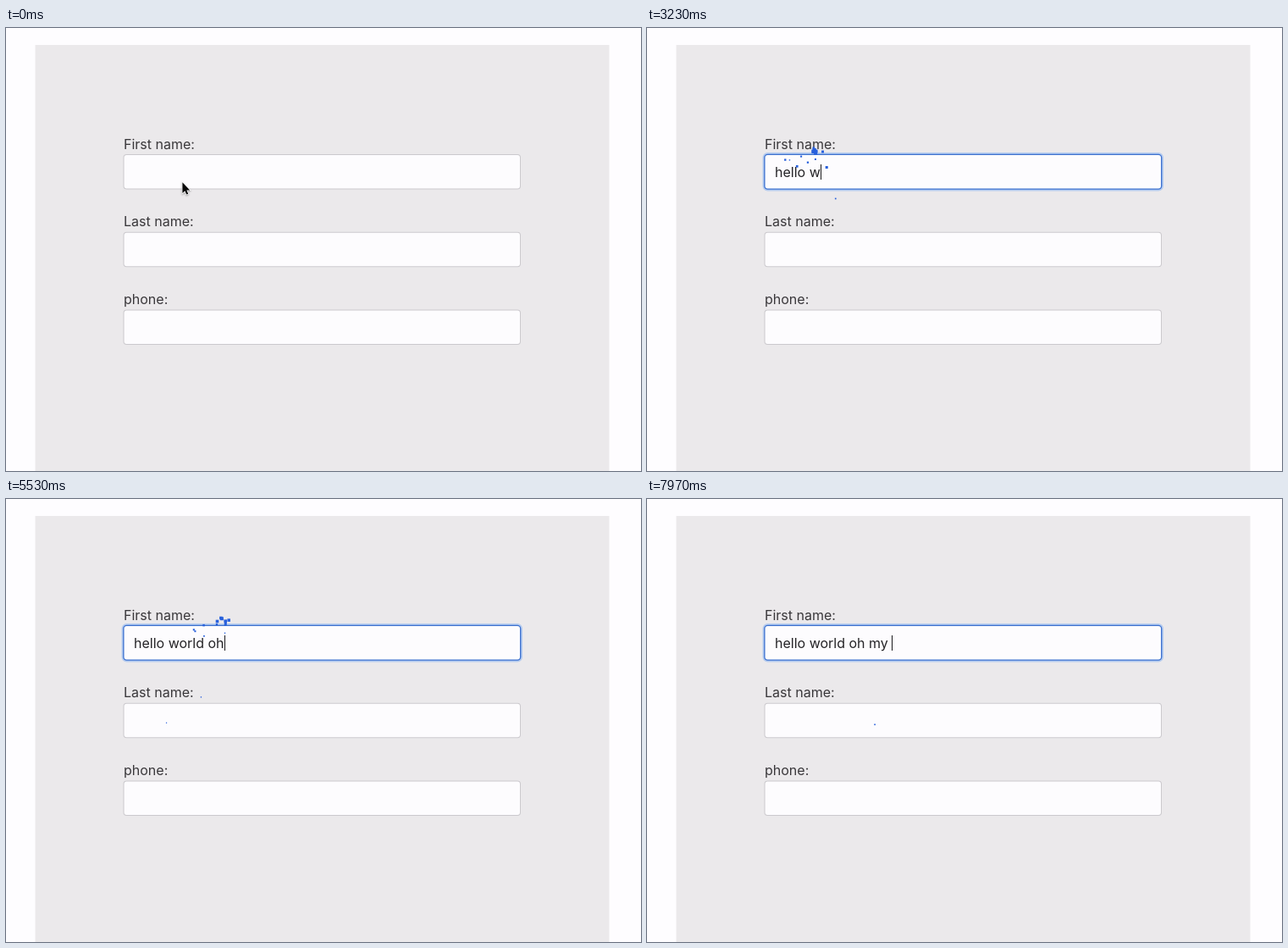
Animation of 750 by 523 pixels, one loop 8000 ms. Source, as an HTML page with a canvas:

```html
<!DOCTYPE html>
<html lang="en">
<head>
<meta charset="utf-8">
<title>Typing sparks</title>
<style>
  html, body { margin: 0; width: 100%; height: 100%; overflow: hidden; background: #fefdff; }
  canvas { display: block; width: 750px; height: 523px; }
</style>
</head>
<body>
<canvas id="stage"></canvas>
<script>
const W = 750, H = 523, LOOP = 8000;
const LABELS = ['First name:', 'Last name:', 'phone:'];
const FIELD = { x: 138.5, y: 149, w: 469.5, h: 41.5, pitch: 91.7 };
const TEXT_X = 151, TEXT_Y = 176, SPARK_Y = 161;
const FOCUS = 30, BLINK = 470;
const GRAVITY = 0.0005;

const MESSAGE = 'hello world oh my ';
const PRESSES = [
  970, 1450, 1730, 2010, 2400, 2700, 3030, 3350, 3600,
  3850, 4170, 4600, 5020, 5350, 5780, 6200, 6600, 7010
];

const canvas = document.getElementById('stage');
const ctx = canvas.getContext('2d');
const dpr = window.devicePixelRatio || 1;
canvas.width = W * dpr;
canvas.height = H * dpr;
ctx.scale(dpr, dpr);
ctx.font = '16px Inter, sans-serif';

function seeded(seed) {
  return () => {
    seed = (seed * 16807) % 2147483647;
    return seed / 2147483647;
  };
}

const random = seeded(90210);
const between = (low, high) => low + (high - low) * random();
const caretX = count => TEXT_X + ctx.measureText(MESSAGE.slice(0, count)).width;

// Every key press throws a small burst from the caret.
const sparks = PRESSES.flatMap((start, i) => {
  const count = Math.round(between(5, 8));
  return Array.from({ length: count }, () => ({
    x: caretX(i + 1),
    start,
    vx: between(-0.065, 0.045),
    vy: between(-0.16, -0.115),
    size: between(2.8, 5),
    life: between(550, 985)
  }));
});

function box(x, y, w, h, r, color) {
  ctx.fillStyle = color;
  ctx.beginPath();
  ctx.roundRect(x, y, w, h, r);
  ctx.fill();
}

function text(str, x, y, color) {
  ctx.fillStyle = color;
  ctx.fillText(str, x, y);
}

function drawField(label, i, focus) {
  const { x, w, h } = FIELD;
  const y = FIELD.y + i * FIELD.pitch;
  const grown = (d, r, color) => box(x - d, y - d, w + 2 * d, h + 2 * d, r, color);
  text(label, 139, y - 6.3, '#39373a');
  grown(0, 4, '#cbc9cd');
  ctx.globalAlpha = focus;
  grown(2, 6, '#b4cbef');
  grown(0.3, 4.3, '#3b70cf');
  ctx.globalAlpha = 1;
  grown(-1, 3, '#fdfcfe');
}

function drawPointer() {
  const shape = [[0, 0], [0, 14.2], [3.2, 11.2], [5.3, 16], [7.6, 15], [5.5, 10.4], [9.8, 10.2]];
  ctx.save();
  ctx.translate(208.4, 182.2);
  ctx.scale(0.9, 0.9);
  ctx.beginPath();
  shape.forEach(([x, y]) => ctx.lineTo(x, y));
  ctx.closePath();
  ctx.lineWidth = 1.6;
  ctx.strokeStyle = '#fff';
  ctx.shadowColor = 'rgba(0,0,0,.35)';
  ctx.shadowBlur = 2 * dpr;
  ctx.shadowOffsetY = dpr;
  ctx.stroke();
  ctx.shadowColor = 'transparent';
  ctx.fillStyle = '#080808';
  ctx.fill();
  ctx.restore();
}

function drawSpark({ x, start, vx, vy, size, life }, t) {
  const age = t - start;
  if (age < 0 || age > life) return;
  const side = size * (1 - 0.65 * age / life);
  const px = x + vx * age;
  const py = SPARK_Y + vy * age + GRAVITY * age * age / 2;
  ctx.fillRect(px - side / 2, py - side / 2, side, side);
}

function draw(t) {
  ctx.fillStyle = '#fefdff';
  ctx.fillRect(0, 0, W, H);
  ctx.fillStyle = '#ebe9eb';
  ctx.fillRect(34.5, 20, 678, H - 20);

  const p = Math.min(1, Math.max(0, (t - FOCUS) / 200));
  const focus = p * p * (3 - 2 * p);
  LABELS.forEach((label, i) => drawField(label, i, i ? 0 : focus));

  const count = PRESSES.filter(press => press <= t).length;
  text(MESSAGE.slice(0, count), TEXT_X, TEXT_Y, '#242326');

  // The caret's blink restarts at every key press.
  const since = t - (count ? PRESSES[count - 1] : FOCUS);
  if (since >= 0 && since % (2 * BLINK) < BLINK) {
    ctx.fillStyle = '#19181b';
    ctx.fillRect(Math.round(caretX(count)), 161, 1, 18);
  }

  if (!count) drawPointer();
  ctx.fillStyle = '#2860dc';
  sparks.forEach(spark => drawSpark(spark, t));
}

const begin = performance.now();
function tick() {
  draw((performance.now() - begin) % LOOP);
  requestAnimationFrame(tick);
}
tick();
</script>
</body>
</html>
```
